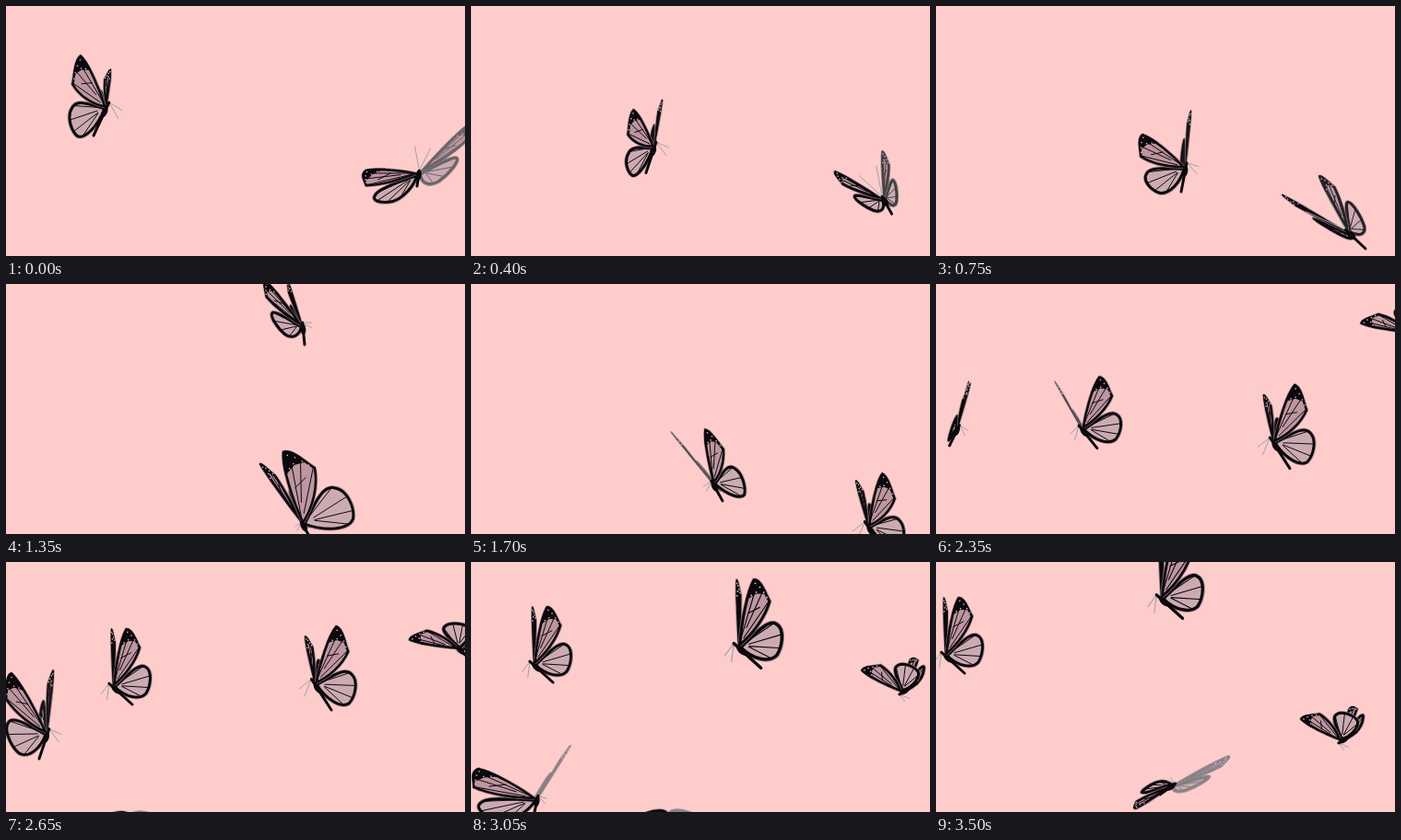
Animation, 498 px wide and 272 px high, one loop 3550 ms. Source, as an HTML page with a canvas:

```html
<!DOCTYPE html>
<html lang="en">
<head>
<meta charset="utf-8">
<title>Butterflies</title>
<style>
html, body { margin: 0; width: 100%; height: 100%; overflow: hidden; background: #fcc; }
canvas { display: block; }
</style>
</head>
<body>
<canvas id="stage" width="498" height="272"></canvas>
<script>
const ctx = document.getElementById('stage').getContext('2d');
const LOOP = 3550, STEP = 50;

// Unit wing: (1,0) is the forewing tip, (0,1) the hindwing tip.
const FORE = new Path2D('M0 0C.3-.08.8-.12 1 0C1.03.2.86.35.74.54C.5.52.2.3 0 0Z');
const HIND = new Path2D('M0 0C.25.3.52.55.46.8C.42 1.05.15 1.1 0 1C-.15.85-.15.4 0 0Z');
const APEX = new Path2D('M.6-.2L1.1-.2L1.1.2L.83.42L.8.15Z');
const FORE_VEINS = new Path2D('M0 0L.97.12M.3.09L.88.3M.15.08L.75.5M.5.05L.62.3');
const HIND_VEINS = new Path2D('M0 0L.44.72M.08.24L.32 1M.05.25L.12 1.04M.04.25L-.06.9');
const DOTS = [[.94, .07], [.9, .2], [.84, .32], [.78, .42], [.76, .04], [.82, .14]];

// Near wing (fore tip, hind tip), far wing (same), tail, greyness of the far wing.
const POSES = {
  rise:   [-28, -58, -32, 32, 5, -42, -12, 0, -14, 30, 0],
  half:   [-47, -37, -28, 29, 6, -62, -6, -4, -5, 26, .1],
  climb:  [-40, -50, -20, 10, -16, -50, -8, 0, 2, 20, 0],
  spread: [-58, -4, -28, 32, 54, -54, 22, 10, -2, 14, .75],
  dive:   [-72, -42, -8, 4, -33, -62, 18, -8, 18, 17, .2],
  broad:  [-22, -80, 56, -6, -47, -66, 10, -10, 8, 14, 0],
  edge:   [23, -52, 38, 16, -57, -41, 2, 12, 12, 22, 1],
  open:   [23, -64, 38, 22, -11, -52, 12, -4, 18, 28, 0],
  shut:   [14, -64, 37, 8, -2, -63, 8, -4, 21, 19, 0],
  reach:  [67, -32, 10, 2, 17, -33, 8, -4, -9, 10, 0],
  vee:    [-39, -67, -32, 22, 7, -69, -10, -6, -9, 27, .1],
  wide:   [-64, -34, -42, 24, 36, -58, -3, -2, -4, 18, 1],
  glide:  [-55, -10, 10, -26, 30, -26, 20, -4, 6, 6, 0],
  fan:    [-45, -24, 18, -24, 8, -36, 22, -16, 16, -10, 0],
  flat:   [-45, 10, -10, -10, 45, 10, 10, -10, 0, 12, 1],
  tilt:   [-40, 26, -20, -4, 60, -32, 16, 6, -14, 10, 1]
};

// Keys: time, x, y, pose, scale. Side tells where the antennae point.
const BUTTERFLIES = [
  { side: -1, keys: [[0, 109, 111, 'rise'], [750, 271, 176, 'half'], [1100, 306, 118, 'climb'],
    [1350, 322, 46, 'climb'], [1600, 334, -60, 'climb']] },
  { side: 0, keys: [[0, 448, 182, 'spread'], [750, 448, 247, 'dive'], [1100, 450, 345, 'dive']] },
  { side: 1, keys: [[950, 380, 355, 'broad'], [1350, 322, 262, 'broad'], [2050, 204, 184, 'edge'],
    [2650, 116, 136, 'shut'], [3050, 68, 112, 'shut'], [3500, 10, 102, 'shut']] },
  { side: 1, keys: [[1350, 468, 345, 'open'], [1650, 436, 273, 'open'], [2050, 396, 215, 'open'],
    [2650, 335, 133, 'open'], [3050, 290, 93, 'shut', 1.17], [3500, 244, 40, 'shut', 1.12]] },
  { side: -1, keys: [[1650, -80, 75, 'reach'], [2050, -5, 130, 'reach'], [2650, 45, 187, 'vee'],
    [3050, 72, 258, 'wide'], [3350, 95, 350, 'wide']] },
  { side: 1, keys: [[1950, 548, -15, 'glide'], [2050, 540, 8, 'glide'], [2650, 492, 95, 'glide'],
    [3050, 468, 142, 'fan'], [3500, 440, 195, 'fan']] },
  { side: 1, keys: [[2550, 115, 290, 'flat'], [2650, 135, 281, 'flat'], [3050, 214, 279, 'flat'],
    [3500, 257, 243, 'tilt']] }
];

const mix = (a, b, p) => a + (b - a) * p;

function slope(keys, i, axis) {
  const a = keys[Math.max(i - 1, 0)], b = keys[Math.min(i + 1, keys.length - 1)];
  return (b[axis] - a[axis]) / (b[0] - a[0]);
}

function glideTo(keys, i, axis, p) {
  const a = keys[i], b = keys[i + 1], d = b[0] - a[0], q = 1 - p;
  return a[axis] * q * q * (1 + 2 * p) + b[axis] * p * p * (3 - 2 * p)
    + d * p * q * (slope(keys, i, axis) * q - slope(keys, i + 1, axis) * p);
}

// Squeezes the wings toward the body axis.
function flap(pose, amount) {
  const [bx, by] = pose.slice(8, 10), length = Math.hypot(bx, by) || 1;
  const nx = -by / length, ny = bx / length;
  for (let i = 0; i < 8; i += 2) {
    const off = (pose[i] * nx + pose[i + 1] * ny) * amount;
    pose[i] -= nx * off;
    pose[i + 1] -= ny * off;
  }
}

function line(path, color, width) {
  ctx.strokeStyle = color;
  ctx.lineWidth = width;
  ctx.stroke(path);
}

function drawPanel(shape, veins, matrix, fill, ink, width) {
  const place = path => {
    const placed = new Path2D();
    placed.addPath(path, matrix);
    return placed;
  };
  const outline = place(shape);
  line(outline, 'rgba(125,112,116,.7)', 1.6);
  ctx.fillStyle = fill;
  ctx.fill(outline);
  ctx.save();
  ctx.clip(outline);
  line(place(veins), ink, 1);
  line(outline, ink, width);
  if (shape === FORE) {
    ctx.fillStyle = ink;
    ctx.fill(place(APEX));
    ctx.fillStyle = '#d9bcc1';
    for (const [u, v] of DOTS) {
      const dot = matrix.transformPoint({ x: u, y: v });
      ctx.fillRect(dot.x - .7, dot.y - .7, 1.4, 1.4);
    }
  }
  ctx.restore();
}

function drawWing(vectors, gray) {
  const matrix = new DOMMatrix([...vectors, 0, 0]);
  const v = Math.round(mix(12, 135, gray));
  const ink = `rgb(${v},${v - 4},${v})`;
  drawPanel(HIND, HIND_VEINS, matrix, '#cbabb1', ink, 6);
  drawPanel(FORE, FORE_VEINS, matrix, '#bd96a0', ink, 5);
}

function drawBody(bx, by, side) {
  const [ax, ay] = side ? [-by * side * .5, bx * side * .5] : [-bx * 2, -by * 2];
  const feelers = new Path2D();
  for (const turn of [-.3, .3]) {
    feelers.moveTo(-bx * .2, -by * .2);
    feelers.lineTo(ax - ay * turn, ay + ax * turn);
  }
  line(feelers, '#9da3a6', 1);
  const body = new Path2D();
  body.moveTo(-bx * .2, -by * .2);
  body.lineTo(bx, by);
  line(body, '#0c080c', 3);
  body.lineTo(bx * .3, by * .3);
  ctx.fillStyle = '#0c080c';
  ctx.beginPath();
  ctx.ellipse(bx * .15, by * .15, 6, 3, Math.atan2(by, bx), 0, 7);
  ctx.fill();
}

function drawButterfly({ side, keys }, time) {
  const i = keys.findIndex((key, n) => n < keys.length - 1 && key[0] <= time && time <= keys[n + 1][0]);
  if (i < 0) return;
  const a = keys[i], b = keys[i + 1], span = b[0] - a[0], p = (time - a[0]) / span;
  const pose = POSES[a[3]].map((value, n) => mix(value, POSES[b[3]][n], p));
  const beats = Math.max(1, Math.round(span / 250));
  flap(pose, .35 * Math.sin(Math.PI * beats * p) ** 2);
  const scale = mix(a[4] || 1, b[4] || 1, p);
  ctx.save();
  ctx.translate(glideTo(keys, i, 1, p), glideTo(keys, i, 2, p));
  ctx.scale(scale, scale);
  drawWing(pose.slice(4, 8), pose[10]);
  drawWing(pose.slice(0, 4), 0);
  drawBody(pose[8], pose[9], side);
  ctx.restore();
}

function render(now) {
  const time = Math.floor((now % LOOP) / STEP) * STEP;
  ctx.fillStyle = '#fcc';
  ctx.fillRect(0, 0, 498, 272);
  ctx.lineCap = ctx.lineJoin = 'round';
  BUTTERFLIES.forEach(butterfly => drawButterfly(butterfly, time));
}

const start = performance.now();
function tick() {
  render(performance.now() - start);
  requestAnimationFrame(tick);
}
tick();
</script>
</body>
</html>
```
